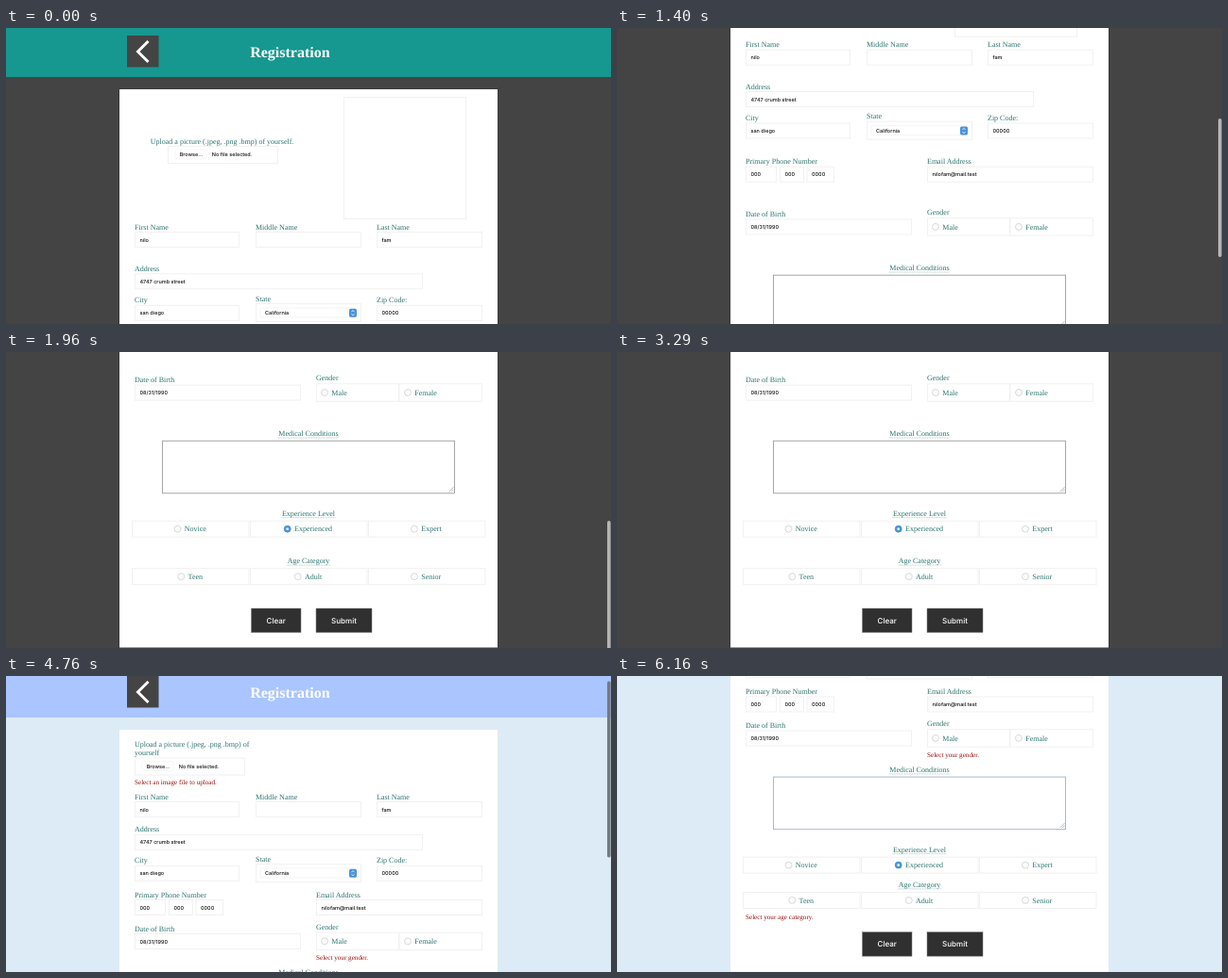
These frames come from a looping animation (640x314 px, 6.23 s). An HTML page:

```html
<!DOCTYPE html>
<html lang="en">
<head>
<meta charset="utf-8">
<title>Registration</title>
<style>
html, body { margin: 0; width: 100%; height: 100%; overflow: hidden; }
svg { display: block; width: 640px; height: 314px; }
text { font-family: "Liberation Serif", "Times New Roman", serif; font-size: 8px; fill: #2b746e; text-rendering: geometricPrecision; }
.title { font-size: 16px; font-weight: bold; fill: #fff; }
.value { font: 500 5.5px Inter, sans-serif; fill: #111; }
.error { font-size: 7.15px; fill: #950d0d; }
.btn { font: 500 8px Inter, sans-serif; fill: #fff; }
.mid { text-anchor: middle; }
.box { fill: #fff; stroke: #f1f1f1; stroke-width: 1; }
.dots { stroke: #86b0ac; stroke-width: .6; stroke-dasharray: 1 .6; }
</style>
</head>
<body>
<svg id="stage" viewBox="0 0 640 314" xmlns="http://www.w3.org/2000/svg"></svg>
<script>
const LOOP = 6230, STEP = 70;

const rect = (x, y, w, h, attrs) => `<rect x="${x}" y="${y}" width="${w}" height="${h}" ${attrs}/>`;
const box = (x, y, w, h) => rect(x + .5, y + .5, w - 1, h - 1, 'class="box"');
const text = (x, y, str, cls = '') => `<text x="${x}" y="${y}" class="${cls}">${str}</text>`;

// y is the middle of the label line
const label = (x, y, str) => text(x, y + 2.6, str);
const error = (x, y, str) => text(x, y + 2.2, str, 'error');
const input = (x, y, w, value) => box(x, y + 5, w, 17) + text(x + 5.5, y + 15.6, value, 'value');
const field = (x, y, w, name, value = '') => label(x, y, name) + input(x, y, w, value);

const heading = (y, str, half) =>
  text(320, y + 2.6, str, 'mid') +
  `<line x1="${320 - half}" x2="${320 + half}" y1="${y + 4.7}" y2="${y + 4.7}" class="dots"/>`;

const radio = (x, y, name, on) =>
  `<circle cx="${x}" cy="${y}" r="3.5" fill="${on ? '#4a97d9' : '#fbfbfb'}" stroke="${on ? '#3f88c8' : '#cacaca'}" stroke-width=".7"/>` +
  (on ? `<circle cx="${x}" cy="${y}" r="1.3" fill="#fff"/>` : '') +
  text(x + 7.3, y + 2.8, name);

const choices = (y, names, xs, on) => names.map((name, i) =>
  box(133 + i * 125, y, 124.5, 18) + radio(xs[i], y + 9, name, i === on)).join('');

const upload = (x, y) =>
  box(x, y, 117, 19) +
  rect(x + 8, y + 4, 33, 10, 'rx="2" fill="#fff" stroke="#f2f2f2" stroke-width=".6"') +
  text(x + 12.7, y + 11.3, 'Browse...', 'value') +
  text(x + 46.8, y + 11.3, 'No file selected.', 'value');

const select = (y) =>
  label(264, y, 'State') + box(264, y + 5, 112, 20) +
  rect(269, y + 10, 103, 10, 'rx="2" fill="#fff" stroke="#ececec" stroke-width=".6"') +
  text(274, y + 17.4, 'California', 'value') +
  rect(363, y + 10.7, 8, 9, 'rx="1.6" fill="#4a93d8"') +
  `<path d="M365.5 ${y + 14.2}l1.5 -1.6 1.5 1.6M365.5 ${y + 16.3}l1.5 1.6 1.5 -1.6" fill="none" stroke="#fff" stroke-width=".8"/>`;

const button = (x, y, w, name) =>
  rect(x, y, w, 25.5, 'fill="#303030" stroke="#777" stroke-width=".5"') +
  text(x + w / 2, y + 15.7, name, 'btn mid');

const textarea = (y, stroke) =>
  rect(165.5, y, 309, 55.5, `fill="#fff" stroke="${stroke}"`) +
  `<path d="M468.5 ${y + 54}l5 -5M471 ${y + 54}l2.5 -2.5" stroke="#999" stroke-width=".7"/>`;

function page(p) {
  const { names, address, city, phone, birth, medical, level, age, buttons } = p.rows;
  return rect(0, 0, 640, 52, `fill="${p.header}"`) +
    rect(128, 8, 33.5, 33.5, 'fill="#444"') +
    '<path d="M150.5 14L139.5 25L150.5 36" fill="none" stroke="#fff" stroke-width="3"/>' +
    text(300.4, 31, 'Registration', 'title mid') +
    rect(119, 64, 402, p.bottom - 63, `fill="${p.rim}"`) +
    rect(120, 65, 400, p.bottom - 65, 'fill="#fff"') +
    p.intro +
    field(136, names, 111, 'First Name', 'nilo') +
    field(264, names, 112, 'Middle Name') +
    field(392, names, 112, 'Last Name', 'fam') +
    field(136, address, 305, 'Address', '4747 crumb street') +
    field(136, city, 111, 'City', 'san diego') +
    select(city - 1.8) +
    field(392, city, 112, 'Zip Code:', '00000') +
    field(136, phone, 33, 'Primary Phone Number', '000') +
    input(172, phone, 26, '000') + input(200.5, phone, 29.5, '0000') +
    field(328, phone, 176, 'Email Address', 'nilofam@mail.test') +
    field(136, birth, 176, 'Date of Birth', '08/31/1990') +
    label(328, birth - 1.8, 'Gender') +
    box(328, birth + 3.7, 88, 19.5) + box(415.5, birth + 3.7, 88.5, 19.5) +
    radio(337, birth + 13.4, 'Male') + radio(425, birth + 13.4, 'Female') +
    heading(medical, 'Medical Conditions', 32) +
    textarea(medical + 7.9, p.edge) +
    heading(level, 'Experience Level', 28.5) +
    choices(level + 7.7, ['Novice', 'Experienced', 'Expert'], [181.5, 297.7, 432], 1) +
    heading(age, 'Age Category', 22.7) +
    choices(age + 7.8, ['Teen', 'Adult', 'Senior'], [185.3, 308.8, 432]) +
    button(259.5, buttons, 52.5, 'Clear') +
    button(328, buttons, 59, 'Submit') + p.notes;
}

const pages = [
  {
    bg: '#444', rim: '#393939', header: '#16978f', edge: '#a6a6a6', bottom: 674.7,
    thumb: '#b5b5b5', ratio: .494, thumbH: 147,
    rows: { names: 211, address: 255.3, city: 288.8, phone: 335, birth: 390.8,
            medical: 447.6, level: 532.2, age: 582.6, buttons: 633.2 },
    intro: label(152.8, 120, 'Upload a picture (.jpeg, .png .bmp) of yourself.') +
      upload(171, 125) + box(357, 73, 130, 130),
    notes: ''
  },
  {
    bg: '#dcebf6', rim: '#dcebf6', header: '#aac5ff', edge: '#a9bac8', bottom: 537.2,
    thumb: '#737a82', ratio: .62, thumbH: 187,
    rows: { names: 136, address: 170.8, city: 203.8, phone: 240, birth: 276,
            medical: 322.7, level: 407.4, age: 444.6, buttons: 495.2 },
    intro: label(136, 80, 'Upload a picture (.jpeg, .png .bmp) of') +
      label(136, 89, 'yourself') + upload(136, 94.5) +
      error(136, 121, 'Select an image file to upload.'),
    notes: error(328, 307, 'Select your gender.') + error(136, 479, 'Select your age category.')
  }
];

const stage = document.getElementById('stage');
stage.innerHTML = pages.map(p =>
  `<g>${rect(0, 0, 640, 314, `fill="${p.bg}"`)}<g>${page(p)}</g>` +
  rect(636, 0, 3.6, p.thumbH, `rx="1.8" fill="${p.thumb}"`) + '</g>').join('');
const views = [...stage.children].map(root => ({ root, body: root.children[1], thumb: root.children[2] }));

const SWAP = 3710;
const scrolls = [
  [[770, 0], [840, 5], [910, 21], [1400, 193.3], [1750, 324], [1900, 361.2]],
  [[4690, 0], [4760, 8], [5180, 150.5], [5320, 223.5]]
];
const fades = [
  [[770, 0], [840, 1], [2030, 1], [2310, 0]],
  [[3710, 1], [4340, 1], [4620, 0], [4690, 0], [4760, 1], [5740, 1], [5950, 0]]
];

function track(points, t) {
  if (t <= points[0][0]) return points[0][1];
  for (let i = 1; i < points.length; i++) {
    const [t0, v0] = points[i - 1], [t1, v1] = points[i];
    if (t <= t1) return v0 + (v1 - v0) * (t - t0) / (t1 - t0);
  }
  return points[points.length - 1][1];
}

function draw(now) {
  const t = Math.floor(now % LOOP / STEP) * STEP;
  const active = t < SWAP ? 0 : 1;
  views.forEach((v, i) => v.root.setAttribute('display', i === active ? 'inline' : 'none'));
  const { body, thumb } = views[active];
  const y = track(scrolls[active], t);
  body.setAttribute('transform', `translate(0 ${-y})`);
  thumb.setAttribute('y', y * pages[active].ratio + .6);
  thumb.setAttribute('opacity', track(fades[active], t));
}

const start = performance.now();
function tick() {
  draw(performance.now() - start);
  requestAnimationFrame(tick);
}
tick();
</script>
</body>
</html>
```
